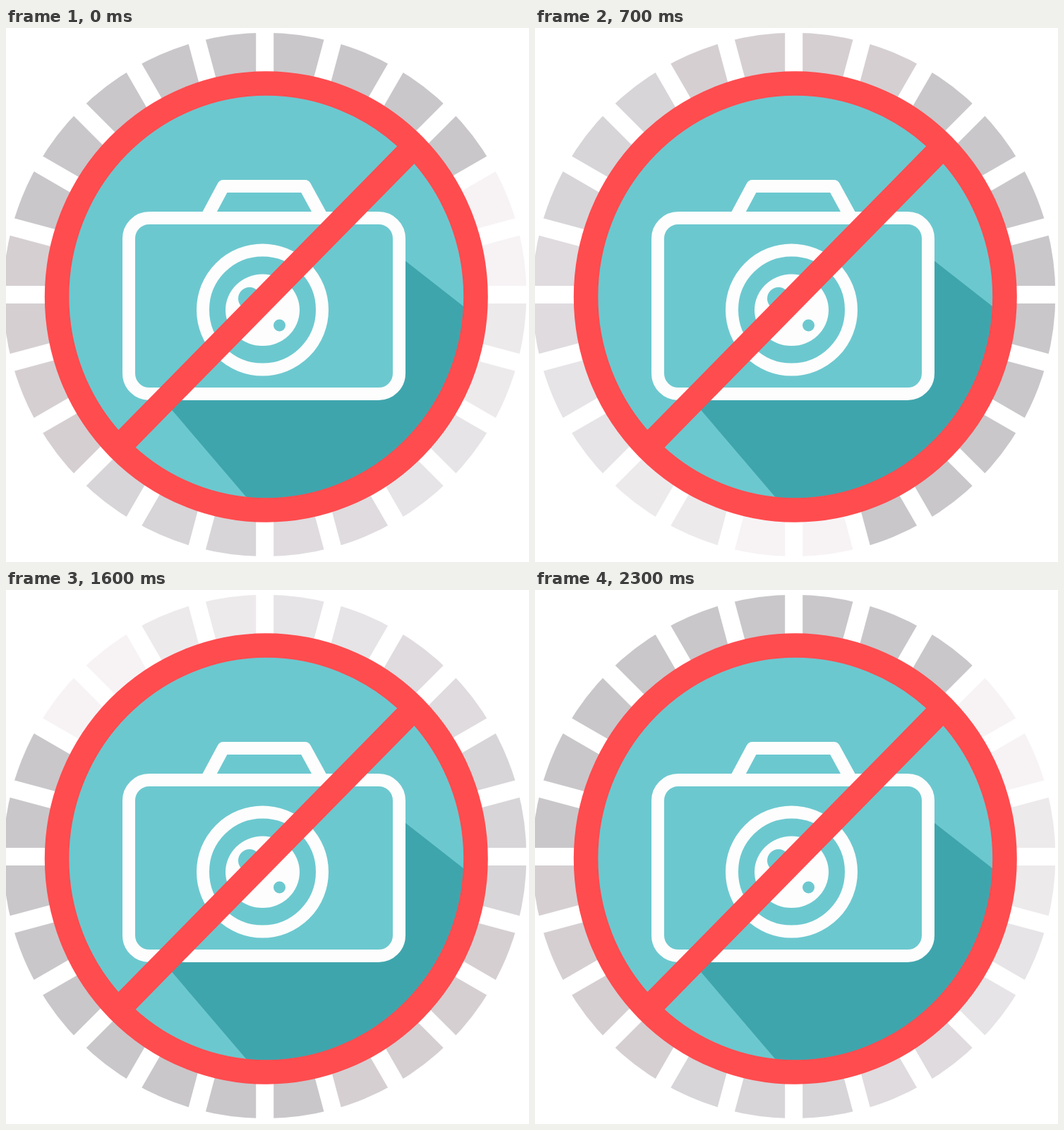
These frames come from a looping animation (741 by 756 pixels, 2400 ms). An HTML page:

```html
<!DOCTYPE html>
<html lang="en">
<head>
<meta charset="utf-8">
<title>No photography</title>
<style>
  html, body { margin: 0; width: 100%; height: 100%; overflow: hidden; background: #fff; }
  svg { display: block; }
</style>
</head>
<body>
<svg width="741" height="756" viewBox="0 0 741 756" fill="none">
  <g id="wheel" transform="translate(366.7 377.5)"></g>

  <clipPath id="disc"><ellipse cx="368.7" cy="380.5" rx="296" ry="301"/></clipPath>
  <g clip-path="url(#disc)">
    <path fill="#6cc8cf" d="M0 0H741V756H0z"/>
    <path fill="#3fa5ad" d="M556 322L740 466V756H419L213 515z"/>
  </g>

  <g stroke="#fdfdfd" stroke-width="18">
    <path stroke-linejoin="round" d="M285.5 266L308 224H423.5L446.500 266"/>
    <rect x="174" y="269" width="383" height="249" rx="29" fill="#6cc8cf"/>
    <circle cx="363.5" cy="399" r="84.500"/>
  </g>
  <ellipse cx="363.5" cy="399.3" rx="52.5" ry="50.7" fill="#fdfdfd"/>
  <g fill="#6cc8cf">
    <circle cx="345" cy="383" r="16"/>
    <circle cx="387.5" cy="421" r="8.500"/>
  </g>

  <g stroke="#ff4c4f" stroke-width="34.6">
    <ellipse cx="368.8" cy="380.5" rx="296.700" ry="302"/>
    <path d="M575 171L163 590"/>
  </g>
</svg>
<script>
const COUNT = 24, STEP_MS = 100, RADIUS = 370.7, FIRST = 4;
// Shades behind the moving head, each with the number of segments it covers.
const shades = [
  ['#f7f3f5', 2], ['#edeaec', 2], ['#e6e4e6', 2], ['#dfdbde', 2],
  ['#d7d5d8', 3], ['#d5cfd2', 4], ['#c9c7ca', 9]
].flatMap(([color, n]) => Array(n).fill(color));

const wheel = document.getElementById('wheel');
const rim = k => {
  const a = k * 2 * Math.PI / COUNT;
  return `${RADIUS * Math.sin(a)} ${-RADIUS * Math.cos(a)}`;
};
function addPath(d, attrs = {}) {
  const path = document.createElementNS('http://www.w3.org/2000/svg', 'path');
  for (const [name, value] of Object.entries({ d, ...attrs })) path.setAttribute(name, value);
  return wheel.appendChild(path);
}

const segments = Array.from({ length: COUNT }, (_, k) =>
  addPath(`M0 0L${rim(k)}A${RADIUS} ${RADIUS} 0 0 1 ${rim(k + 1)}z`));

// White spokes of constant width separate the segments.
for (let k = 0; k < COUNT; k++)
  addPath(`M0 0V-380`, { stroke: '#fff', 'stroke-width': 25, transform: `rotate(${k * 360 / COUNT})` });

function draw(now) {
  const head = FIRST + Math.floor(now / STEP_MS) % COUNT;
  segments.forEach((s, k) => s.setAttribute('fill', shades[(k - head + 2 * COUNT) % COUNT]));
  requestAnimationFrame(draw);
}
draw(0);
</script>
</body>
</html>
```
